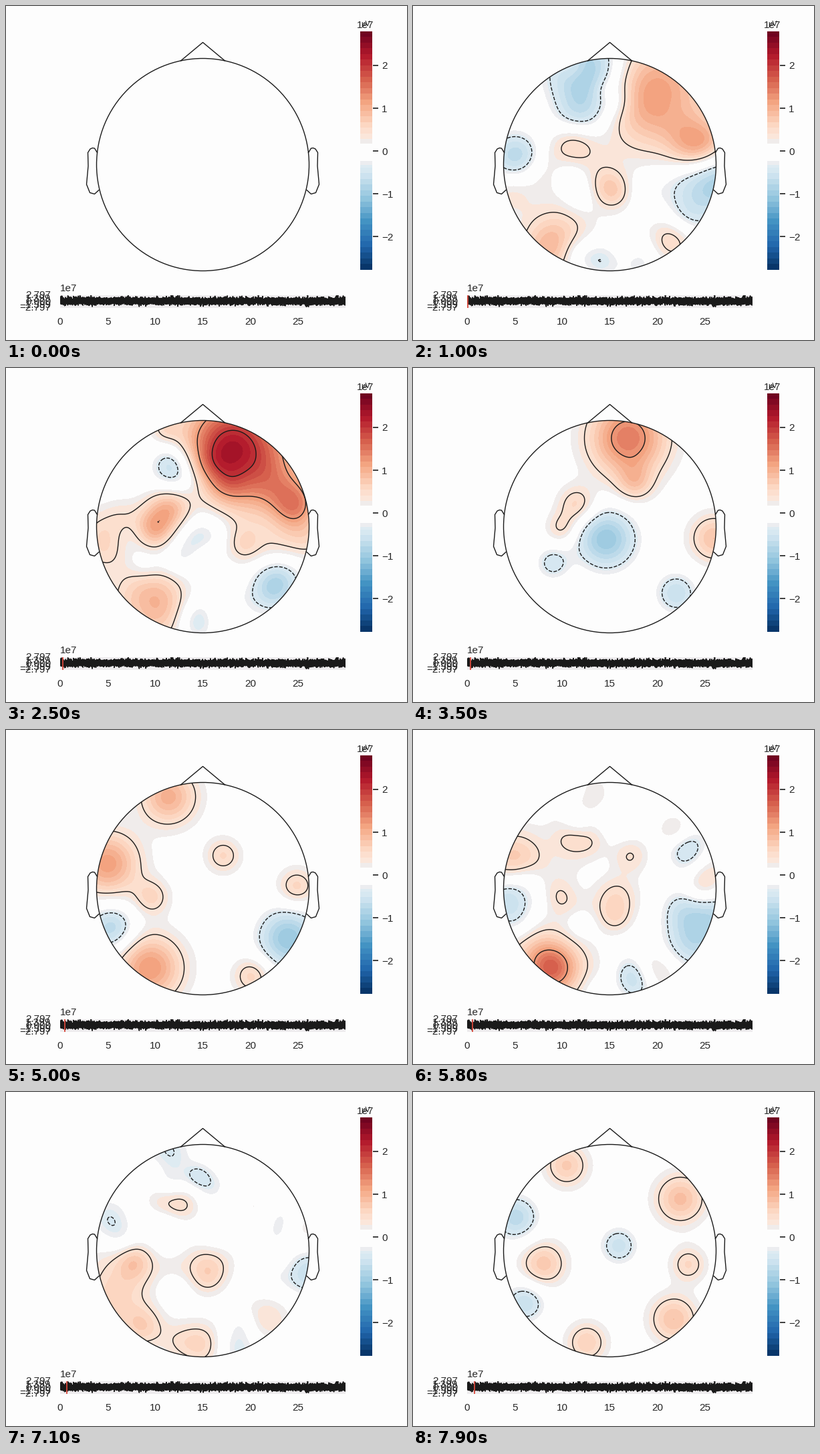
Write a matplotlib script that moves like this. It is 600 px wide and 500 px high and loops after 8 s.

```python
import numpy as np
import matplotlib.pyplot as plt
from matplotlib.animation import FuncAnimation
from matplotlib.colors import BoundaryNorm, ListedColormap
from matplotlib.patches import Circle, Rectangle

plt.rcParams["font.family"] = "Liberation Sans"

FRAMES, STEP = 80, 100
PAPER, WARM_GRAY, COOL_GRAY = "#fdfdfd", "#f0eceb", "#ecedf0"
INK, TEXT, RED = "#1a1a1a", "#262626", "#d9483b"
VMAX = 2.797
CX, CY, R = 294.5, 237.5, 159
X0, PX_PER_S, MID = 81, 14.23, 441.7

gx, gy = np.meshgrid(np.arange(135.5, 454), np.arange(78.5, 397))
rng = np.random.default_rng(4)


def bump(x, y, size):
    return np.exp(-((gx - x) ** 2 + (gy - y) ** 2) / (2 * size ** 2))


def scalp(*sources):
    """Sum of (x, y, strength) sources; stronger ones spread wider."""
    return sum(s * bump(x, y, 6 + 24 * abs(s)) for x, y, s in sources)


# Main sources at the moments the activity passes through
states = {
    -8: np.zeros_like(gx),
    4: scalp((262, 98, -1.45), (150, 222, -.8), (229, 245, -.65), (290, 268, .65),
             (356, 268, -.65), (455, 268, -1.1), (388, 348, .8), (244, 372, -.65),
             (334, 378, -.65)),
    19: scalp((358, 133, 2.1), (428, 215, .7), (355, 265, .6), (257, 165, -.95),
              (246, 209, .85), (221, 242, .8), (217, 355, 1.35), (291, 375, -.75),
              (408, 318, -.8)),
    35: scalp((322, 105, 1.45), (332, 172, .55), (245, 205, .6), (222, 240, .45),
              (289, 256, -1.05), (209, 292, -.5), (450, 255, .8), (394, 337, -.65)),
    50: scalp((243, 100, 1), (152, 200, 1.15), (218, 250, .55), (158, 297, -.8),
              (215, 356, 1.2), (325, 188, .55), (422, 312, -1.05), (368, 368, .6),
              (435, 235, .6)),
    67: scalp((238, 95, -.8), (263, 167, .55), (407, 178, -.6), (452, 270, -.75),
              (165, 312, 1), (206, 352, .65), (295, 380, .75), (304, 252, .75)),
    79: scalp((230, 110, .7), (154, 188, -.75), (168, 315, -.65), (195, 257, .75),
              (308, 230, -.6), (260, 375, .65), (390, 340, .8), (400, 160, .85),
              (412, 258, .55)),
}
times = list(states)

# Extra activity that rises and falls between those moments
N = 26
rad, ang = R * np.sqrt(rng.random(N)), rng.uniform(0, 2 * np.pi, N)
drift = np.array([
    .4 * bump(CX + r * np.cos(a), CY + r * np.sin(a), s)
    for r, a, s in zip(rad, ang, rng.uniform(14, 26, N))
])
period, phase = rng.uniform(9, 20, N), rng.uniform(0, 2 * np.pi, N)


def field(i):
    k = min(np.searchsorted(times, i, side="right"), len(times) - 1)
    a, b = times[k - 1], times[k]
    u = (i - a) / (b - a)
    swing = np.sin(2 * np.pi * i / period + phase)
    return (np.cos(u * np.pi / 2) * states[a] + np.sin(u * np.pi / 2) * states[b]
            + np.sin(u * np.pi) * np.tensordot(swing, drift, 1))


# Stepped red-blue scale with a blank middle
steps = VMAX / 21 * np.arange(3, 22)
bounds = np.r_[-steps[::-1], -.34, -.25, .156, .266, steps]
colors = list(plt.get_cmap("RdBu_r")(.5 + (bounds[1:] + bounds[:-1]) / 4 / VMAX))
low = len(steps)
colors[low:low + 3] = COOL_GRAY, PAPER, WARM_GRAY
cmap = ListedColormap(colors)
norm = BoundaryNorm(bounds, cmap.N)
levels = np.linspace(-VMAX, VMAX, 8)[1:-1]

fig = plt.figure(figsize=(6, 5), dpi=100, facecolor=PAPER)
ax = fig.add_axes([0, 0, 1, 1])
ax.axis("off")


def label(x, y, s, size=11, **kw):
    ax.text(x, y, s.replace("-", "\u2212"), size=size, color=TEXT, **kw)


# Head
disc = Circle((CX, CY), R, fill=False, ec=INK, lw=1, zorder=5)
image = ax.imshow(np.zeros_like(gx), cmap=cmap, norm=norm, aspect="auto",
                  extent=(135, 454, 397, 78), interpolation="nearest")
ax.set(xlim=(0, 600), ylim=(500, 0))
ax.add_patch(disc)
image.set_clip_path(disc)
ax.plot([261.5, CX, 327.5], [82, 54.5, 82], color=INK, lw=1)
ear_x = np.array([158, 162, 165, 168.5, 172, 171.5, 174, 169, 162, 155.5])
ear_y = np.array([-18, -24.5, -25, -23.5, -18, 2, 29.5, 42, 44, 38])
for side in (-1, 1):
    ax.plot(CX + side * ear_x, CY + ear_y, color=INK, lw=1)

# Color scale
scale_y = 216.3 - 63.8 * bounds
for y0, y1, c in zip(scale_y, scale_y[1:], colors):
    ax.add_patch(Rectangle((530, y1), 18, y0 - y1, fc=c, lw=0, antialiased=False))
for v in range(-2, 3):
    y = 216.9 - 64.2 * v
    ax.plot([549, 557.3], [y, y], color=TEXT, lw=1.25, solid_capstyle="butt")
    label(562, y + .5, str(v), va="center_baseline")
label(525, 33, "1e7")
label(538, 30, "\u00b5V", 8, ha="center")

# Signal strip
strip = Rectangle((X0, 432.5), 427, 19.5, fc="#eeecee", lw=0)
ax.add_patch(strip)
t = np.arange(0, 30, 1 / 300)
wave = np.clip(rng.normal(0, 2.5, t.size), -9, 9)
trace, = ax.plot(X0 + PX_PER_S * t, MID + wave, color=INK, lw=1.2)
trace.set_clip_path(strip)
cursor, = ax.plot([X0, X0], [432.5, 452], color=RED, lw=1.3,
                  solid_capstyle="butt", zorder=4)
label(X0, 427, "1e7")
for s in range(0, 30, 5):
    label(X0 + PX_PER_S * s, 477, str(s), ha="center")
for k in range(-2, 3):
    value = k * VMAX / 2 + np.sign(k) * 1e-6
    label(67, MID - .5 - 4.9 * k, f"{value:.3f}", ha="right", va="center_baseline")

contours = []


def draw(i):
    while contours:
        contours.pop().remove()
    image.set_visible(i > 0)
    cursor.set_visible(i > 0)
    if i > 0:
        z = field(i)
        image.set_data(z)
        lines = ax.contour(gx[::2, ::2], gy[::2, ::2], z[::2, ::2], levels,
                           colors=INK, linewidths=1, zorder=3)
        lines.set_clip_path(disc)
        contours.append(lines)
        ax.set(xlim=(0, 600), ylim=(500, 0))
        cursor.set_xdata([X0 + PX_PER_S * i / 100] * 2)
    return []


anim = FuncAnimation(fig, draw, frames=FRAMES, interval=STEP, repeat=True,
                     repeat_delay=0)
plt.show()
```
